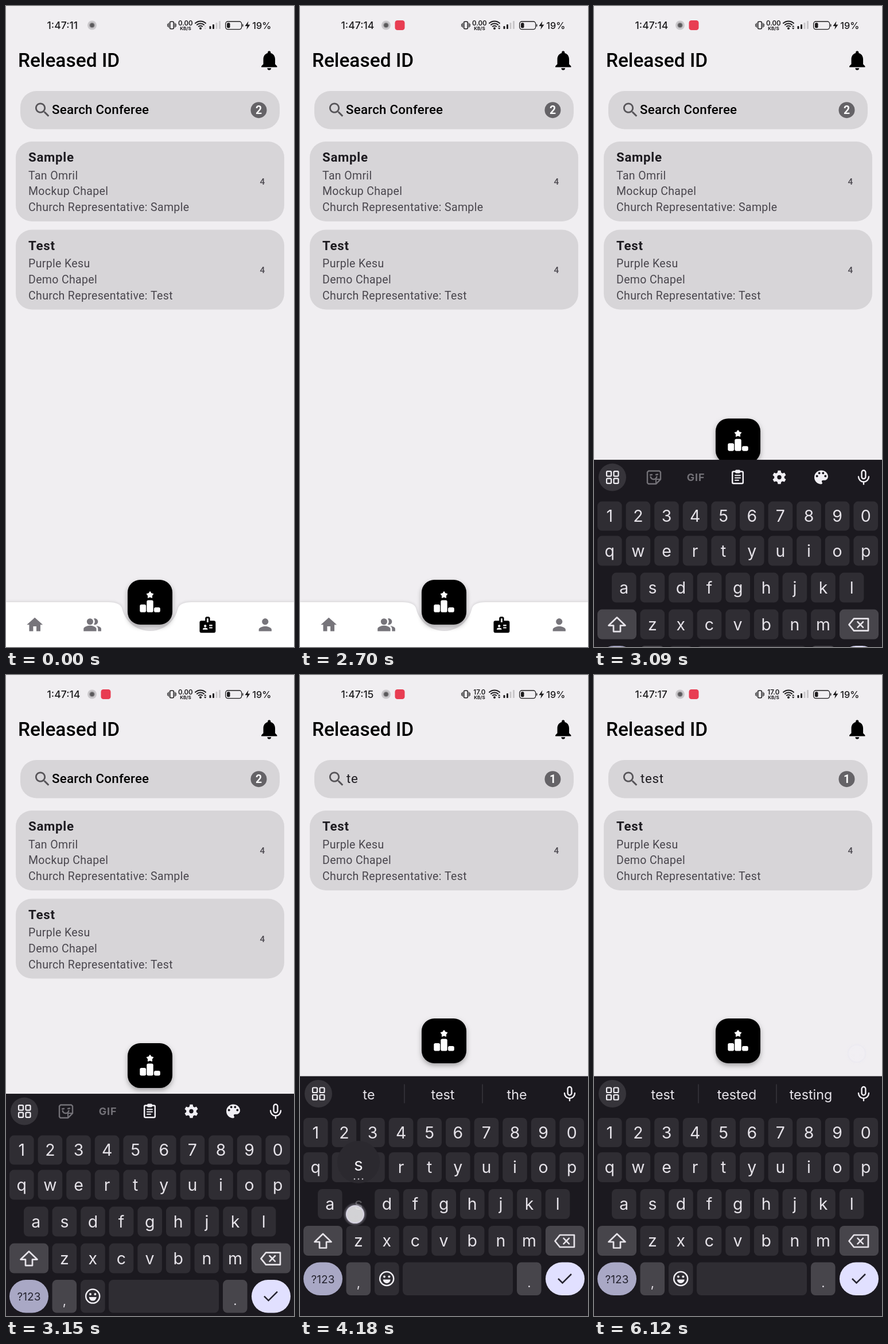
Write an HTML page with a canvas that moves like this. It is 502 px wide and 1116 px high and loops after 6180 ms.

```html
<!DOCTYPE html>
<html lang="en">
<head>
<meta charset="utf-8">
<title>Released ID</title>
<style>
html, body { margin: 0; width: 100%; height: 100%; overflow: hidden; background: #f0eef1; }
canvas { display: block; width: 502px; height: 1116px; }
</style>
</head>
<body>
<canvas id="stage"></canvas>
<script>
const W = 502, H = 1116, LOOP = 6180;
const canvas = document.getElementById('stage');
const ctx = canvas.getContext('2d');
const dpr = window.devicePixelRatio || 1;
canvas.width = W * dpr;
canvas.height = H * dpr;

const APP = 'Roboto, sans-serif', SYS = 'Inter, sans-serif';
const PAGE = '#f0eef1', CARD = '#d7d5d8';
const BOARD = '#1b191f', KEY = '#2f2d33', KEY2 = '#47454b', INK = '#e6e3e9', PALE = '#f1eff4';

const ICONS = {
  search: 'M15.5 14h-.79l-.28-.27C15.41 12.59 16 11.11 16 9.5 16 5.91 13.09 3 9.5 3S3 5.91 3 9.5 5.91 16 9.5 16c1.61 0 3.09-.59 4.23-1.57l.27.28v.79l5 4.99L20.49 19l-4.99-5zm-6 0C7.01 14 5 11.99 5 9.5S7.01 5 9.5 5 14 7.01 14 9.5 11.99 14 9.5 14z',
  bell: 'M12 22c1.1 0 2-.9 2-2h-4c0 1.1.89 2 2 2zm6-6v-5c0-3.07-1.64-5.64-4.5-6.32V4c0-.83-.67-1.5-1.5-1.5s-1.5.67-1.5 1.5v.68C7.63 5.36 6 7.92 6 11v5l-2 2v1h16v-1l-2-2z',
  home: 'M10 20v-6h4v6h5v-8h3L12 3 2 12h3v8z',
  people: 'M16.67 13.13C18.04 14.06 19 15.32 19 17v3h4v-3c0-2.18-3.57-3.47-6.33-3.87zM15 12c2.21 0 4-1.79 4-4s-1.79-4-4-4c-.47 0-.91.1-1.33.24C14.5 5.27 15 6.58 15 8s-.5 2.73-1.33 3.76c.42.14.86.24 1.33.24zM9 12a4 4 0 1 0 0-8 4 4 0 0 0 0 8zM9 13c-2.67 0-8 1.34-8 4v3h16v-3c0-2.66-5.33-4-8-4z',
  badge: 'M20 7h-5V4c0-1.1-.9-2-2-2h-2c-1.1 0-2 .9-2 2v3H4c-1.1 0-2 .9-2 2v11c0 1.1.9 2 2 2h16c1.1 0 2-.9 2-2V9c0-1.1-.9-2-2-2zM9 12c.83 0 1.5.67 1.5 1.5S9.83 15 9 15s-1.5-.67-1.5-1.5S8.17 12 9 12zm3 6H6v-.75c0-1 2-1.5 3-1.5s3 .5 3 1.5V18zm1-9h-2V4h2v5zm5 7.5h-4V15h4v1.5zm0-3h-4V12h4v1.5z',
  person: 'M12 12c2.21 0 4-1.79 4-4s-1.79-4-4-4-4 1.79-4 4 1.79 4 4 4zm0 2c-2.67 0-8 1.34-8 4v2h16v-2c0-2.66-5.33-4-8-4z',
  palette: 'M12 3c-4.97 0-9 4.03-9 9s4.03 9 9 9c.83 0 1.5-.67 1.5-1.5 0-.39-.15-.74-.39-1.01-.23-.26-.38-.61-.38-.99 0-.83.67-1.5 1.5-1.5H16c2.76 0 5-2.24 5-5 0-4.42-4.03-8-9-8z' +
    [[5, 10.5], [8, 6.5], [13, 6.5], [16, 10.5]].map(([x, y]) => `M${x} ${y}a1.5 1.5 0 1 0 3 0a1.5 1.5 0 1 0-3 0z`).join('')
};
for (const k in ICONS) ICONS[k] = new Path2D(ICONS[k]);

const PEOPLE = [
  { name: 'Sample', team: 'Tan Omril', church: 'Mockup Chapel' },
  { name: 'Test', team: 'Purple Kesu', church: 'Demo Chapel' }
];

// key, key centre (y from keyboard top), touch point, press and release times
const PRESSES = [
  { key: 't', x: 226, y: 159, px: 223, py: 876, down: 3640, up: 3730 },
  { key: 'e', x: 126.5, y: 159, px: 123, py: 878, down: 3880, up: 3970 },
  { key: 's', x: 102, y: 223, px: 96, py: 939, down: 4110, up: 4220 },
  { key: 't', x: 226, y: 159, px: 224, py: 874, down: 4340, up: 4420 }
];
const TOUCHES = [
  { px: 273, py: 192, down: 2730, up: 2890 },
  ...PRESSES,
  { px: 458, py: 659, down: 5940, up: 5970 }
];
const HINTS = [null, ['t', 'to', 'the'], ['te', 'test', 'the'], ['tes', 'test', 'tests'], ['test', 'tested', 'testing']];
const TICKS = [670, 1670, 2700, 3670, 4610, 5670];

const clamp = v => Math.max(0, Math.min(1, v));

function ease(x) { // cubic-bezier(.4, 0, .2, 1)
  x = clamp(x);
  let lo = 0, hi = 1, s = 0.5;
  for (let i = 0; i < 24; i++) {
    s = (lo + hi) / 2;
    const v = 1.2 * (1 - s) ** 2 * s + 0.6 * (1 - s) * s * s + s ** 3;
    if (v < x) lo = s; else hi = s;
  }
  return 3 * s * s - 2 * s ** 3;
}
const keyboardTop = t => H - 418 * ease((t - 2916.5) / 346);

function box(x, y, w, h, r, fill) {
  ctx.beginPath();
  ctx.roundRect(x, y, w, h, r);
  ctx.fillStyle = fill;
  ctx.fill();
}
function frame(x, y, w, h, r, color, lw) {
  ctx.beginPath();
  ctx.roundRect(x, y, w, h, r);
  ctx.strokeStyle = color;
  ctx.lineWidth = lw;
  ctx.stroke();
}
function disc(x, y, r, fill) {
  ctx.beginPath();
  ctx.arc(x, y, r, 0, 7);
  ctx.fillStyle = fill;
  ctx.fill();
}
function arc(x, y, r, from, to, color, lw) {
  ctx.beginPath();
  ctx.arc(x, y, r, from, to);
  ctx.strokeStyle = color;
  ctx.lineWidth = lw;
  ctx.stroke();
}
function line(points, color, lw, close) {
  ctx.beginPath();
  points.forEach(([x, y]) => ctx.lineTo(x, y));
  if (close) ctx.closePath();
  ctx.strokeStyle = color;
  ctx.lineWidth = lw;
  ctx.stroke();
}
function poly(points, fill) {
  ctx.beginPath();
  points.forEach(([x, y]) => ctx.lineTo(x, y));
  ctx.closePath();
  ctx.fillStyle = fill;
  ctx.fill();
}
function text(str, x, y, font, color, align = 'left', spacing = 0) {
  ctx.font = font;
  ctx.fillStyle = color;
  ctx.textAlign = align;
  ctx.letterSpacing = spacing + 'px';
  ctx.fillText(str, x, y);
}
function icon(name, cx, cy, scale, color) {
  ctx.save();
  ctx.translate(cx - 12 * scale, cy - 12 * scale);
  ctx.scale(scale, scale);
  ctx.fillStyle = color;
  ctx.fill(ICONS[name], 'evenodd');
  ctx.restore();
}

function statusBar(t) {
  const dark = '#1c1b1d';
  const sec = 11 + TICKS.filter(k => t >= k).length;
  text('1:47:' + sec, 71.5, 40, '500 17.6px ' + SYS, dark);
  disc(150, 33.5, 8, '#cbc9cc');
  disc(150, 33.5, 5, '#a09ea1');
  disc(150, 33.5, 3.6, '#5a595b');

  const rec = ease((t - 610) / 360);
  if (rec > 0) {
    const r = 8.5 * (0.4 + 0.6 * rec);
    ctx.globalAlpha = rec;
    box(174 - r, 33.5 - r, 2 * r, 2 * r, r / 2, '#e83d52');
    ctx.globalAlpha = 1;
  }

  frame(285.7, 27.2, 6.6, 12.6, 1.5, dark, 1.6);
  for (const s of [-1, 1]) {
    line([[289 + s * 5.6, 29.5], [289 + s * 5.6, 37.5]], dark, 1.2);
    line([[289 + s * 7.4, 31], [289 + s * 7.4, 36]], dark, 1);
  }
  text(t < 3670 ? '0.00' : '17.0', 312.8, 34, '600 11.5px ' + SYS, dark, 'center');
  text('KB/S', 313, 42, '700 8px ' + SYS, dark, 'center');

  ctx.lineCap = 'butt';
  for (const r of [5.5, 9.5, 13.5]) arc(339, 40, r, -Math.PI * 0.75, -Math.PI * 0.25, dark, 2);
  disc(339, 39, 2, dark);
  const arrow = t < 90 ? '#d3d1d4' : dark;
  poly([[345, 36.5], [349.4, 36.5], [347.2, 33.8]], arrow);
  poly([[345, 38], [349.4, 38], [347.2, 40.7]], arrow);

  for (let i = 0; i < 4; i++) {
    const h = 5 + i * 3;
    box(354.5 + i * 5.5, 40 - h, 3, h, 0.8, i < 2 ? dark : '#c9c7ca');
  }
  frame(382.7, 27, 28, 13.6, 4, dark, 1.3);
  box(385, 29.3, 5.5, 9, 2, dark);
  box(412, 31.5, 1.4, 4.5, 0.7, dark);
  poly([[422.5, 26.5], [416.5, 35], [420.5, 35], [419.3, 41], [425.5, 32.4], [421.4, 32.4]], dark);
  text('19%', 429.3, 39.5, '500 16.3px ' + SYS, dark);
}

function card(person, y) {
  const small = '400 19.5px ' + APP, soft = '#49464d';
  box(17, y, 468, 139, 28, CARD);
  text(person.name, 39, y + 35, '700 22.3px ' + APP, '#1d1b20', 'left', 0.7);
  [person.team, person.church, 'Church Representative: ' + person.name].forEach((s, i) =>
    text(s, 39, y + 65.5 + i * 27.9, small, soft, 'left', 0.35));
  text('4', 442.5, y + 75, '500 15.3px ' + APP, soft);
}

function page(typed) {
  text('Released ID', 21, 106, '500 33.46px ' + APP, '#000');
  icon('bell', 458.8, 94.5, 1.71, '#000');

  box(25, 148, 452, 66.5, 28, CARD);
  icon('search', 63.5, 181, 1.394, '#565458');
  if (typed) text(typed, 81, 188, '400 22.3px ' + APP, '#1d1b20', 'left', 0.7);
  else text('Search Conferee', 80, 188, '500 22.3px ' + APP, '#000', 'left', 0.25);

  const list = PEOPLE.filter(p => p.name.toLowerCase().includes(typed));
  disc(440.5, 181.2, 14, '#656367');
  text(String(list.length), 440.5, 188.2, '700 19.5px ' + APP, '#fff', 'center');
  list.forEach((p, i) => card(p, 236 + i * 153.5));
}

function shadow(color, blur, dy) {
  ctx.shadowColor = color;
  ctx.shadowBlur = blur * dpr;
  ctx.shadowOffsetY = dy * dpr;
}

function navBar() {
  const cx = W / 2, top = 1038, r = 50, a = Math.asin(11.6 / r);
  ctx.save();
  shadow('rgba(0,0,0,.12)', 5, -1);
  ctx.beginPath();
  ctx.moveTo(0, top);
  ctx.lineTo(cx - 72.3, top);
  ctx.quadraticCurveTo(cx - 51.4, top, cx - 48.6, top + 11.6);
  ctx.arc(cx, top, r, Math.PI - a, a, true);
  ctx.quadraticCurveTo(cx + 51.4, top, cx + 72.3, top);
  ctx.lineTo(W, top);
  ctx.lineTo(W, H);
  ctx.lineTo(0, H);
  ctx.closePath();
  ctx.fillStyle = '#fff';
  ctx.fill();
  ctx.restore();
  const grey = '#77757b';
  icon('home', 50.2, 1077.3, 1.394, grey);
  icon('people', 150.6, 1077.3, 1.394, grey);
  icon('badge', 351.4, 1077.3, 1.394, '#000');
  icon('person', 451.8, 1077.3, 1.394, grey);
}

function rankButton(y) {
  ctx.save();
  shadow('rgba(0,0,0,.32)', 9, 4);
  box(212, y, 78, 78, 22, '#000');
  ctx.restore();
  const star = [];
  for (let i = 0; i < 10; i++) {
    const a = i * Math.PI / 5 - Math.PI / 2, r = i % 2 ? 3.2 : 5.6;
    star.push([251 + r * Math.cos(a), y + 26.4 + r * Math.sin(a)]);
  }
  poly(star, '#fff');
  ctx.lineJoin = 'round';
  line(star, '#fff', 1.6, true);
  box(233.3, y + 43, 10.8, 13.5, 2.8, '#fff');
  box(245.3, y + 35.5, 11.4, 21, 2.8, '#fff');
  box(258, y + 48, 10.8, 8.5, 2.8, '#fff');
}

function toolIcons() {
  const dim = '#737177';
  // sticker
  line([[108, 42.5], [95, 42.5], [93, 40.5], [93, 22], [95, 20], [114, 20], [116, 22], [116, 34.5], [108, 42.5]], dim, 2.4);
  line([[108, 42], [108, 34.5], [116, 34.5]], dim, 2);
  line([[98, 27], [101, 26.5]], dim, 2.4);
  line([[108, 26.5], [111, 26]], dim, 2.4);
  arc(104, 29, 5.5, 0.2, 2.9, dim, 2.4);
  text('GIF', 177.5, 37.5, '700 18px ' + SYS, dim, 'center', 0.8);
  // clipboard
  frame(241.2, 21, 18.6, 20.8, 2, PALE, 2.5);
  box(246, 18, 9, 6, 2, PALE);
  [27.8, 32, 36.2].forEach((y, i) => line([[246, y], [i < 2 ? 255 : 252, y]], PALE, 2));
  // gear
  for (let i = 0; i < 6; i++) {
    ctx.save();
    ctx.translate(323, 31);
    ctx.rotate(i * Math.PI / 3);
    poly([[-3.6, -6], [-2.5, -11.8], [2.5, -11.8], [3.6, -6]], PALE);
    ctx.restore();
  }
  disc(323, 31, 8.8, PALE);
  disc(323, 31, 3.7, BOARD);
  icon('palette', 396, 31, 1.33, PALE);
}

function letterKeys(held) {
  const rows = [['1234567890', 6, 73, 51], ['qwertyuiop', 6, 133, 52], ['asdfghjkl', 31, 197, 52], ['zxcvbnm', 80.5, 261, 52]];
  for (const [chars, x0, y, h] of rows) {
    [...chars].forEach((c, i) => {
      const x = x0 + i * 49.6, down = held && held.key === c;
      if (!down) box(x, y, 42.6, h, 8, KEY);
      ctx.globalAlpha = down ? 0.3 : 1;
      text(c, x + 21.3, y + h / 2 + 10.3, '400 28.5px ' + SYS, INK, 'center');
      ctx.globalAlpha = 1;
    });
  }
}

function controlKeys() {
  // shift and backspace
  box(6, 261, 68, 52, 8, KEY2);
  line([[40, 275], [25.5, 289], [34, 289], [34, 299.5], [46, 299.5], [46, 289], [54.5, 289]], INK, 2.7, true);
  box(428, 261, 68, 52, 8, KEY2);
  line([[444.5, 287.5], [453, 277], [478, 277], [478, 298], [453, 298]], INK, 2.7, true);
  line([[459.5, 282.7], [469, 292.3]], INK, 2.6);
  line([[469, 282.7], [459.5, 292.3]], INK, 2.6);
  // bottom row
  box(6, 324.5, 68, 57.5, 28.7, '#a9a8c5');
  text('?123', 40, 360.5, '400 19px ' + SYS, '#24232f', 'center');
  box(80.5, 324.5, 42.6, 57.5, 8, KEY2);
  text(',', 102, 368, '400 22px ' + SYS, INK, 'center');
  box(130, 324.5, 42.6, 57.5, 8, KEY);
  arc(151.2, 353, 12, 0, 7, PALE, 2.5);
  disc(147, 349.5, 2, PALE);
  disc(155.4, 349.5, 2, PALE);
  ctx.beginPath();
  ctx.arc(151.2, 354.5, 6.5, 0, Math.PI);
  ctx.fill();
  box(179, 324.5, 192, 57.5, 8, KEY);
  box(378, 324.5, 42.6, 57.5, 8, KEY2);
  text('.', 399.3, 368, '400 22px ' + SYS, INK, 'center');
  box(428, 324.5, 68, 57.5, 28.7, '#e1e0ff');
  ctx.lineCap = 'butt';
  ctx.lineJoin = 'miter';
  line([[450, 353], [457.5, 360.5], [473, 345]], '#24232f', 2.5);
}

function popup(p, t) {
  const a = clamp((t - p.down + 20) / 40) * clamp(1 - (t - p.up) / 60);
  if (t < p.down || a <= 0) return;
  ctx.globalAlpha = a;
  disc(p.x, p.y - 73, 37, '#2b292f');
  text(p.key, p.x, p.y - 58, '400 30px ' + SYS, PALE, 'center');
  for (const d of [-7, 0, 7]) disc(p.x + d, p.y - 43.5, 1.2, '#c9c6cd');
  ctx.globalAlpha = 1;
}

function keyboard(top, t, hints) {
  ctx.save();
  ctx.translate(0, top);
  ctx.lineCap = ctx.lineJoin = 'round';
  ctx.fillStyle = BOARD;
  ctx.fillRect(0, 0.5, W, 420);

  disc(32, 31, 24, '#36343a');
  for (const x of [22, 34.5]) for (const y of [20.5, 33]) frame(x, y, 8, 8.5, 1.5, PALE, 2.2);
  if (hints) {
    hints.forEach((s, i) => text(s, 120 + i * 129, 40.5, '400 23.3px ' + SYS, INK, 'center'));
    for (const x of [182, 318]) line([[x, 15], [x, 47]], '#3d3b41', 1.3);
  } else toolIcons();
  // microphone
  frame(466.6, 19, 6.8, 14.5, 3.4, PALE, 2.4);
  arc(470, 30, 9, 0, Math.PI, PALE, 2.4);
  line([[470, 39], [470, 43]], PALE, 2.4);

  letterKeys(PRESSES.find(p => t >= p.down && t < p.up));
  controlKeys();
  PRESSES.forEach(p => popup(p, t));
  ctx.restore();
}

function touch({ px, py, down, up }, t) {
  const a = clamp((t - down + 30) / 60) * clamp(1 - (t - up) / 190);
  if (t < down || a <= 0) return;
  ctx.globalAlpha = a;
  const glow = ctx.createRadialGradient(px, py, 15, px, py, 21);
  glow.addColorStop(0, 'rgba(225,222,238,.4)');
  glow.addColorStop(1, 'rgba(225,222,238,0)');
  disc(px, py, 21, glow);
  disc(px, py, 15, 'rgba(255,255,255,.7)');
  arc(px, py, 15, 0, 7, 'rgba(222,219,234,.85)', 2.2);
  ctx.globalAlpha = 1;
}

function draw(t) {
  ctx.setTransform(dpr, 0, 0, dpr, 0, 0);
  ctx.fillStyle = PAGE;
  ctx.fillRect(0, 0, W, H);
  const count = PRESSES.filter(p => t >= p.up + 20).length;
  const docked = t < 3040;

  statusBar(t);
  page('test'.slice(0, count));
  if (docked) navBar();
  rankButton(docked ? 999 : keyboardTop(t - 17) - 100);
  const top = keyboardTop(t);
  if (top < H - 0.5) keyboard(top, t, HINTS[count]);
  TOUCHES.forEach(p => touch(p, t));
}

const start = performance.now();
function tick() {
  draw((performance.now() - start) % LOOP);
  requestAnimationFrame(tick);
}
tick();
</script>
</body>
</html>
```
